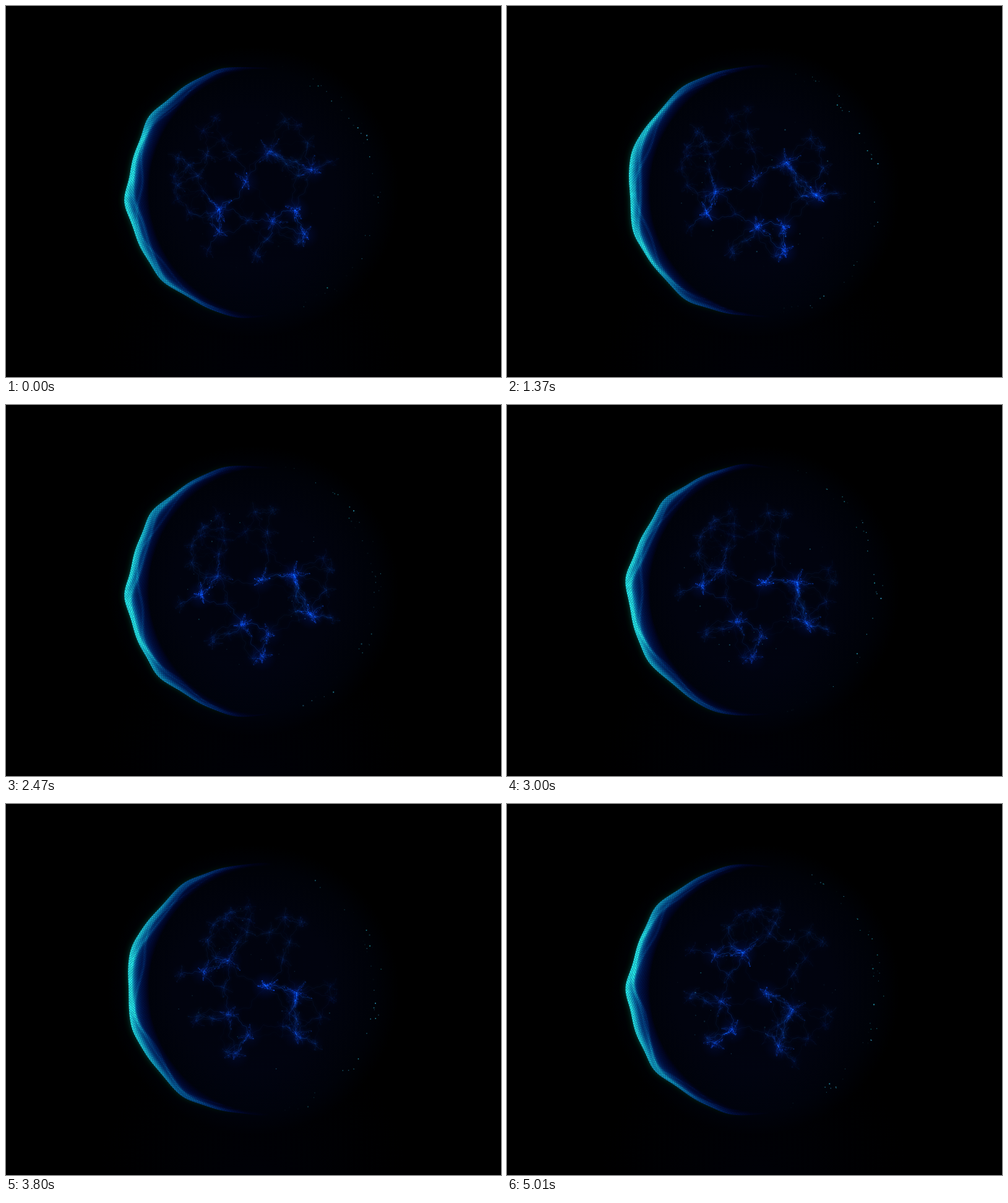
An HTML page with a canvas that plays this animation: 800x600 px, repeating every 5050 ms.

```html
<!DOCTYPE html>
<html lang="en">
<head>
<meta charset="utf-8">
<title>Glowing sphere</title>
<style>
  html, body { margin: 0; width: 100%; height: 100%; overflow: hidden; background: #000; }
  canvas { display: block; width: 800px; height: 600px; }
</style>
</head>
<body>
<canvas id="stage" width="800" height="600"></canvas>
<script>
const ctx = document.getElementById('stage').getContext('2d');
const LOOP = 5.05, STEPS_PER_SECOND = 30, CX = 400, CY = 300, RADIUS = 200;
const SPIN = 16.5; // degrees per second, clockwise
const RAD = Math.PI / 180;
const { sin, cos, exp, pow, abs, min, max, floor, hypot } = Math;
const mix = (a, b, u) => a + (b - a) * u;
const clamp = v => max(0, min(1, v));
const bell = (x, width) => exp(-x * x / (width * width));

function seeded(seed) {
  return () => {
    seed = (seed + 0x6D2B79F5) | 0;
    let x = Math.imul(seed ^ (seed >>> 15), 1 | seed);
    x = (x + Math.imul(x ^ (x >>> 7), 61 | x)) ^ x;
    return ((x ^ (x >>> 14)) >>> 0) / 4294967296;
  };
}

// Dim light inside the sphere and on the ground below it.
function glowDisc(x, y, r, stops) {
  const g = ctx.createRadialGradient(x, y, 0, x, y, r);
  stops.forEach(([at, colour]) => g.addColorStop(at, colour));
  return g;
}
const haze = glowDisc(CX, CY, 235, [[0, 'rgb(1,3,15)'], [0.55, 'rgb(1,3,14)'], [0.84, 'rgb(0,2,8)'], [1, '#000']]);
const ground = glowDisc(CX, 610, 250, [[0, 'rgb(0,1,7)'], [1, '#000']]);

// Ridges 39 degrees apart travel up the lit edge, with finer ripples on top.
function bulge(deg, t) {
  const a = (deg + SPIN * t) * RAD;
  const ridge = exp(1.1 * (cos((deg - 4 + SPIN * t) * RAD * 360 / 39) - 1));
  return 0.5 + 6.5 * ridge + 1.2 * sin(5 * a + t) + 0.8 * sin(17 * a - 2 * t);
}

function drawRim(t) {
  ctx.globalCompositeOperation = 'lighten';
  for (let deg = -100, i = 0; deg <= 100; deg += 0.6, i++) {
    const a = deg * RAD, c = cos(a), s = sin(a), facing = max(0, c);
    const swell = bulge(deg, t) * mix(0.5, 1, facing);
    const r = RADIUS + swell;
    const width = 4 + swell + 27 * pow(facing, 1.1);
    const light = (0.1 + 0.9 * pow(facing, 1.3)) * clamp((100 - abs(deg)) / 25);
    const fold1 = 0.3 + 0.22 * sin(5 * a + 1.3 * t);
    const fold2 = 0.45 + 0.22 * sin(8 * a + 2 * t + 2);
    for (let d = -10, k = 0; d < width; d += 2, k++) {
      if (d < 0) {
        const e = light * exp(d / 3.4);
        ctx.fillStyle = `rgb(0 ${75 * e} ${66 * e})`;
      } else {
        const u = d / width;
        const shade = 0.68 * bell(u, 0.32) + 0.36 * pow(1 - u, 0.8)
          + 0.22 * bell(u - fold1, 0.08) + 0.14 * bell(u - fold2, 0.06);
        const v = min(1, shade * light) * ((k + i) % 2 ? 0.82 : 1);
        ctx.fillStyle = `rgb(${42 * v * v * v} ${238 * pow(v, 1.5)} ${230 * pow(v, 0.7)})`;
      }
      ctx.fillRect(CX - (r - d) * c - 1.2, CY + (r - d) * s - 1.2, 2.4, 2.4);
    }
  }
}

// Angle and radius of the brightest knots of the web; the others are scattered.
const brightKnots = [[58, 57], [-129, 20], [24, 74], [153, 62], [-20, 101], [-69, 70], [130, 86], [40, 108]];
const webRnd = seeded(91);
const makeKnot = (angle, r, size) => ({
  angle, r, size, phase: webRnd() * 6.3,
  twigs: Array.from({ length: 4 }, (_, j) => ({ angle: 90 * j + 70 * webRnd(), len: 10 + 16 * webRnd() }))
});
const knots = [
  ...brightKnots.map(([angle, r]) => makeKnot(angle, r, 1)),
  ...Array.from({ length: 30 }, () => makeKnot(webRnd() * 360, mix(35, 135, Math.sqrt(webRnd())), 0.3))
];

// Knots near the middle turn faster.
function knotAt(k, t) {
  const turn = (13 + 500 / (k.r + 10)) * t;
  const a = (k.angle + turn) * RAD;
  return {
    ...k, turn, x: CX + k.r * cos(a), y: CY + k.r * sin(a),
    glow: k.size * (0.75 + 0.25 * cos(1.2 * t + k.phase))
  };
}

function thread(x0, y0, x1, y1, seed, t, glow) {
  const len = hypot(x1 - x0, y1 - y0) || 1, n = Math.ceil(len / 3);
  const nx = (y0 - y1) / len, ny = (x1 - x0) / len;
  const path = new Path2D();
  for (let i = 0; i <= n; i++) {
    const u = i / n, sway = 0.14 * sin(seed * 5) + 0.045 * sin(u * 12 + seed * 3 + t) + 0.025 * sin(u * 27 + seed);
    const off = len * sway * sin(u * Math.PI);
    path.lineTo(mix(x0, x1, u) + nx * off, mix(y0, y1, u) + ny * off);
  }
  ctx.lineWidth = 7;
  ctx.strokeStyle = `rgba(0,22,100,${0.22 * glow})`;
  ctx.stroke(path);
  ctx.lineWidth = 1;
  ctx.strokeStyle = `rgba(8,75,140,${0.75 * glow})`;
  ctx.stroke(path);
}

function drawKnot(k, index, t) {
  const reach = 24 * mix(0.5, 1, k.size);
  ctx.fillStyle = glowDisc(k.x, k.y, reach, [[0, `rgba(2,26,110,${0.5 * k.glow})`], [1, 'rgba(0,10,60,0)']]);
  ctx.fillRect(k.x - reach, k.y - reach, reach * 2, reach * 2);
  const rnd = seeded(40 + index);
  k.twigs.forEach((twig, j) => {
    const a = (twig.angle + k.turn) * RAD, len = twig.len * mix(0.6, 1, k.size);
    const ex = k.x + len * cos(a), ey = k.y + len * sin(a);
    thread(k.x, k.y, ex, ey, j + index, t, 0.45 * k.glow);
    for (let i = 0; i < 22 * k.size; i++) {
      const u = pow(rnd(), 1.3), spread = 11 * (1 - u), hot = rnd();
      ctx.fillStyle = `rgba(4,${25 + 35 * hot},${110 + 50 * hot},${0.42 * k.glow})`;
      ctx.fillRect(mix(k.x, ex, u) + (rnd() - 0.5) * spread, mix(k.y, ey, u) + (rnd() - 0.5) * spread, 1.4, 1.4);
    }
  });
}

// Neighbouring knots are joined, more faintly the further apart they drift.
function drawWeb(t) {
  const live = knots.map(k => knotAt(k, t));
  live.forEach((p, i) => {
    for (let j = i + 1; j < live.length; j++) {
      const q = live[j], limit = 40 + 20 * (p.size + q.size);
      const near = 1 - hypot(p.x - q.x, p.y - q.y) / limit;
      if (near > 0) thread(p.x, p.y, q.x, q.y, i + j * 1.7, t, clamp(near * 2.5) * (p.glow + q.glow) * 0.32);
    }
  });
  live.forEach((k, i) => drawKnot(k, i, t));
}

const sparkRnd = seeded(7);
const makeSpark = (lo, hi) => ({
  angle: sparkRnd() * 360, r: mix(lo, hi, sparkRnd()), rate: 1.5 + 3 * sparkRnd(),
  phase: sparkRnd() * 6.3, size: 1.1 + pow(sparkRnd(), 2), hue: sparkRnd()
});
const rimSparks = Array.from({ length: 130 }, () => makeSpark(193, 209));
const innerSparks = Array.from({ length: 44 }, () => makeSpark(50, 135));

function drawSpark(p, t, speed, gain, lit) {
  const a = (p.angle + speed * t) * RAD;
  const glow = gain * lit(cos(a)) * pow(0.5 + 0.5 * sin(t * p.rate + p.phase), 2);
  if (glow < 0.03) return;
  ctx.fillStyle = `rgba(${20 + 40 * p.hue},${150 + 20 * p.hue},${150 + 60 * p.hue},${glow})`;
  ctx.fillRect(CX + p.r * cos(a), CY + p.r * sin(a), p.size, p.size);
}

function drawSparks(t) {
  rimSparks.forEach(p => drawSpark(p, t, 10, 0.9, c => clamp((c - 0.2) * 2.2)));
  innerSparks.forEach(p => drawSpark(p, t, SPIN, 0.4 * clamp(0.2 + t / 1.5), () => 1));
}

function draw(t) {
  ctx.globalCompositeOperation = 'source-over';
  ctx.fillStyle = haze;
  ctx.fillRect(0, 0, 800, 600);
  ctx.globalCompositeOperation = 'lighter';
  ctx.fillStyle = ground;
  ctx.fillRect(0, 0, 800, 600);
  drawWeb(t);
  drawSparks(t);
  drawRim(t);
}

const start = performance.now();
function tick() {
  const t = ((performance.now() - start) / 1000) % LOOP;
  draw(floor(t * STEPS_PER_SECOND + 0.01) / STEPS_PER_SECOND);
  requestAnimationFrame(tick);
}
tick();
</script>
</body>
</html>
```
